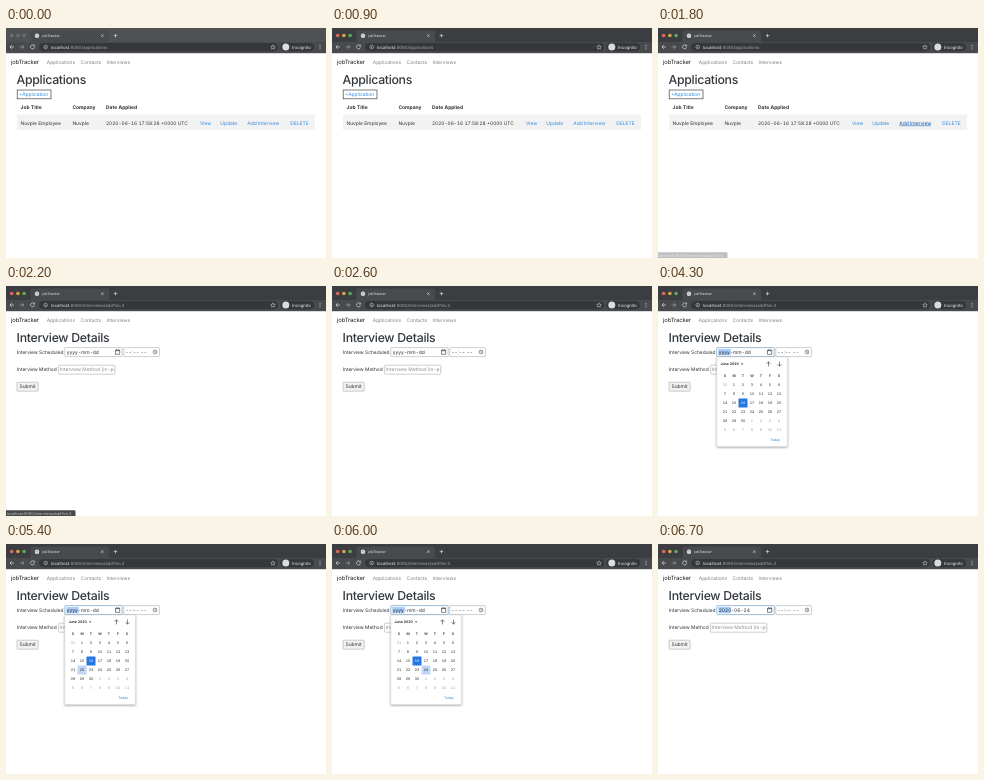
These frames come from a looping animation (320 by 230 pixels, 8 s). An HTML page:

```html
<!DOCTYPE html>
<html lang="en">
<head>
<meta charset="utf-8">
<title>jobTracker</title>
<style>
  html, body { margin: 0; width: 100%; height: 100%; overflow: hidden; background: #fff; }
  svg { display: block; width: 100%; height: 100%; }
  text {
    font: 4.9px Inter, Roboto, sans-serif;
    font-variant-numeric: tabular-nums;
    text-rendering: geometricPrecision;
    fill: #2b3035;
  }
  .title { font-size: 12.3px; font-weight: 500; letter-spacing: -.3px; fill: #33383d; }
  .brand { font-size: 5.85px; letter-spacing: -.12px; fill: #1a1a1a; }
  .nav text { fill: #7f7f7f; font-size: 4.85px; }
  .head text { font-size: 4.95px; font-weight: 700; }
  .link { fill: #2f8ae0; }
  .url { font-size: 4.28px; fill: #a3a8ad; }
  .bright { fill: #eceef0; }
  .icon { fill: none; stroke: #d4d6d9; stroke-width: .7; }
  .ink { fill: none; stroke: #333; stroke-width: .6; }
  .field { fill: #fff; stroke: #adadad; stroke-width: .6; }
  .calendar text { font-size: 3.5px; text-anchor: middle; }
</style>
</head>
<body>
<svg viewBox="0 0 320 230" preserveAspectRatio="none">
  <defs>
    <clipPath id="methodClip"><rect x="53" y="79" width="55.3" height="10"/></clipPath>
    <filter id="shadow" x="-10%" y="-10%" width="120%" height="120%">
      <feDropShadow dx="0" dy=".8" stdDeviation="1" flood-opacity=".4"/>
    </filter>
  </defs>
  <rect width="320" height="230" fill="#fff"/>

  <!-- browser window -->
  <rect id="strip" width="320" height="14.5"/>
  <g fill="#484a4e">
    <path d="M22.5 14.5q2 0 2-2V4.5q0-2 2-2H101q2 0 2 2v8q0 2 2 2z"/>
    <rect y="14" width="320" height="11.2"/>
  </g>
  <g id="lights">
    <circle cx="5.7" cy="7.5" r="1.8"/><circle cx="11.9" cy="7.5" r="1.8"/><circle cx="18.1" cy="7.5" r="1.8"/>
  </g>
  <circle cx="31" cy="7.8" r="2.2" fill="#e8eaed"/>
  <path d="M29.3 7.2h1.6l.7 1-.7 1.2M31.4 6.1l1.2.9" fill="none" stroke="#55585c" stroke-width=".5"/>
  <text class="bright" x="36.3" y="9.1" style="font-size:3.55px">jobTracker</text>
  <path class="icon" d="M95.2 6.5l2.3 2.3m0-2.3l-2.3 2.3M107.7 7.6h3.6m-1.8-1.8v3.6"/>
  <path class="icon" d="M8 19H4m1.9-1.9L4 19l1.9 1.9M28.1 17.6a2 2 0 1 0 .4 1.7M28.6 16.7v1.4h-1.4"/>
  <path class="icon" d="M13.8 19h4m-1.9-1.9l1.9 1.9-1.9 1.9" opacity=".6"/>
  <rect x="33" y="15" width="239" height="8.2" rx="4.1" fill="#36373b"/>
  <rect x="274.5" y="15" width="33.5" height="8.2" rx="4.1" fill="#36373b"/>
  <circle class="icon" cx="39.7" cy="19" r="1.8" style="stroke-width:.5"/>
  <path class="icon" d="M39.7 18.8v1.2m0-2.2v.4"/>
  <text class="url" x="45" y="20.6"><tspan class="bright">localhost</tspan>:8080<tspan id="path"></tspan></text>
  <path class="icon" d="M267 16.8l.7 1.5 1.6.2-1.2 1.1.3 1.6-1.4-.8-1.4.8.3-1.6-1.2-1.1 1.6-.2z" style="stroke-width:.5"/>
  <circle cx="279.8" cy="19" r="3.5" fill="#dadce0"/>
  <text class="bright" x="286" y="20.6" style="font-size:4.3px">Incognito</text>
  <g fill="#dadce0"><circle cx="314" cy="17.2" r=".5"/><circle cx="314" cy="19" r=".5"/><circle cx="314" cy="20.8" r=".5"/></g>

  <text class="brand" x="5" y="36.3">jobTracker</text>
  <g class="nav">
    <text x="40.8" y="36.1">Applications</text>
    <text x="74.6" y="36.1">Contacts</text>
    <text x="100.4" y="36.1">Interviews</text>
  </g>

  <g id="listPage">
    <text class="title" x="10.6" y="55.6">Applications</text>
    <rect x="11.2" y="62" width="33.8" height="8.8" fill="#fff" stroke="#444" stroke-width=".7"/>
    <text class="link" x="13.2" y="68">+Application</text>
    <g class="head">
      <text x="14.5" y="80.7">Job Title</text>
      <text x="66.4" y="80.7">Company</text>
      <text x="100" y="80.7">Date Applied</text>
    </g>
    <rect x="11" y="86.5" width="298" height="15.5" fill="#f2f2f2"/>
    <text x="14.5" y="96.8">Nuvple Employee</text>
    <text x="66.4" y="96.8">Nuvple</text>
    <text x="100" y="96.8" style="font-size:4.8px">2020-06-16 17:58:28 +0000 UTC</text>
    <text class="link" x="194" y="96.8">View</text>
    <text class="link" x="214.3" y="96.8">Update</text>
    <text class="link" id="addLink" x="241.3" y="96.8">Add Interview</text>
    <path id="underline" d="M241.5 97.7H273" stroke="#0056b3" stroke-width=".5"/>
    <text class="link" x="284.3" y="96.8">DELETE</text>
  </g>

  <g id="formPage">
    <text class="title" x="10.6" y="55.6">Interview Details</text>
    <text x="10.8" y="67.7" style="font-size:4.85px">Interview Scheduled</text>
    <rect class="field" id="dateField" x="58.8" y="61.6" width="57.4" height="9" rx=".6"/>
    <rect id="selection" x="60.3" y="62.9" width="12.4" height="6.4" fill="#a9cdf8"/>
    <text id="year" x="60.7" y="67.8"></text>
    <text id="monthDay" y="67.8"></text>
    <path class="ink" d="M109.5 64.2h4.2v4.1h-4.2zM109.5 64.7h4.2M110.5 63.3v.8m2.2-.8v.8"/>
    <rect class="field" x="117.8" y="61.6" width="35.6" height="9" rx=".6"/>
    <text x="119.3" y="67.8">--:-- --</text>
    <circle class="ink" cx="149" cy="66" r="1.9" style="stroke-width:.5"/>
    <path class="ink" d="M149 64.8v1.3l.9.6" style="stroke-width:.5"/>
    <text x="10.8" y="85.3" style="font-size:4.85px">Interview Method</text>
    <rect class="field" x="52.6" y="79.2" width="56.2" height="9" rx=".6"/>
    <text x="53.8" y="85.4" clip-path="url(#methodClip)" style="fill:#8a8a8a">Interview Method (in-person, phone)</text>
    <rect class="field" x="11" y="96.2" width="21.2" height="9" rx=".8" style="fill:#f1f1f1"/>
    <text x="13.5" y="102.4">Submit</text>
  </g>

  <g id="calendar" class="calendar">
    <rect x="58.8" y="71" width="70.6" height="89.6" rx=".6" fill="#fff" stroke="#c4c4c4" stroke-width=".4" filter="url(#shadow)"/>
    <text x="62.4" y="79.3" style="font-weight:700;text-anchor:start">June 2020</text>
    <path d="M82.9 77.4h2.4l-1.2 1.4z" fill="#222"/>
    <path class="ink" d="M110.5 80.4v-4.6m-2 2l2-2 2 2M121.5 75.6v4.6m-2-2l2 2 2-2"/>
    <rect id="hover" width="9" height="9" rx=".6" fill="#bfd6f7"/>
    <rect id="picked" width="9" height="9" rx=".6" fill="#2577df"/>
    <g id="days"></g>
    <text class="link" x="117" y="155.4">Today</text>
  </g>

  <g id="status">
    <path d="M0 224.2H68.2q1.3 0 1.3 1.3V230H0z" fill="#46474b"/>
    <text x=".8" y="228.7" style="font-size:3.78px;fill:#c4c7cb">localhost:8080/interviews/add?id=3</text>
  </g>
</svg>

<script>
const $ = id => document.getElementById(id);
const show = (id, opacity) => $(id).setAttribute('opacity', Number(opacity));
const COLUMN = 9, LEFT = 67, TOP = 99;

// June 2020 begins in the second column of the first week.
const cell = day => ({ x: LEFT + day % 7 * COLUMN, y: TOP + Math.floor(day / 7) * COLUMN });

function addLabel(label, x, y, color, bold) {
  const text = document.createElementNS('http://www.w3.org/2000/svg', 'text');
  text.textContent = label;
  text.setAttribute('x', x);
  text.setAttribute('y', y + 1.3);
  text.style.fill = color;
  if (bold) text.style.fontWeight = 600;
  $('days').append(text);
  return text;
}

[...'SMTWTFS'].forEach((name, i) => addLabel(name, LEFT + i * COLUMN, 90, '#333', true));
const dayLabels = [];
for (let day = 0; day < 42; day++) {
  const inMonth = day >= 1 && day <= 30;
  const { x, y } = cell(day);
  dayLabels[day] = addLabel(inMonth ? day : day ? day - 30 : 31, x, y, inMonth ? '#222' : '#999');
}

function placeBox(id, day) {
  const { x, y } = cell(day);
  $(id).setAttribute('x', x - 4.5);
  $(id).setAttribute('y', y - 4.5);
}

// Each track lists [start time, value]; a value holds until the next start.
const tracks = {
  linkHover: [[0, 0], [1300, .5], [1400, 1]],
  status: [[0, 0], [1800, .35], [1900, 1], [2400, .7], [2500, .3], [2600, 0]],
  calendar: [[0, 0], [4300, 1], [6600, .5], [6700, 0]],
  hoverDay: [[0, 0], [5200, 10], [5300, 15], [5400, 22], [5500, 21], [5600, 23], [5700, 17], [6000, 24]]
};
const valueAt = (track, t) => track.findLast(([start]) => t >= start)[1];

function draw(t) {
  const active = t >= 900, form = t >= 2100, focused = t >= 4000, chosen = t >= 6600;

  $('strip').setAttribute('fill', active ? '#3c3d41' : '#505155');
  ['#e0685f', '#dba545', '#5fae55'].forEach((color, i) =>
    $('lights').children[i].setAttribute('fill', active ? color : '#6d6e72'));
  $('path').textContent = form ? '/interviews/add?id=3' : '/applications';

  show('listPage', !form);
  show('formPage', form);
  const linkHover = valueAt(tracks.linkHover, t);
  show('underline', linkHover);
  $('addLink').style.fill = ['#2f8ae0', '#1870ca', '#0056b3'][linkHover * 2];
  show('status', valueAt(tracks.status, t));

  show('selection', focused);
  $('dateField').style.stroke = focused ? '#5f8fb8' : '';
  $('year').textContent = chosen ? '2020' : 'yyyy';
  $('monthDay').textContent = chosen ? '-06-24' : '-mm-dd';
  $('monthDay').setAttribute('x', chosen ? 72.9 : 71.9);

  const hoverDay = valueAt(tracks.hoverDay, t), pickedDay = chosen ? 24 : 16;
  show('calendar', valueAt(tracks.calendar, t));
  show('hover', hoverDay > 0);
  placeBox('hover', hoverDay);
  placeBox('picked', pickedDay);
  for (const day of [16, 24]) dayLabels[day].style.fill = day === pickedDay ? '#fff' : '#222';
}

const begin = performance.now();
function tick() {
  draw((performance.now() - begin) % 8000);
  requestAnimationFrame(tick);
}
tick();
</script>
</body>
</html>
```
